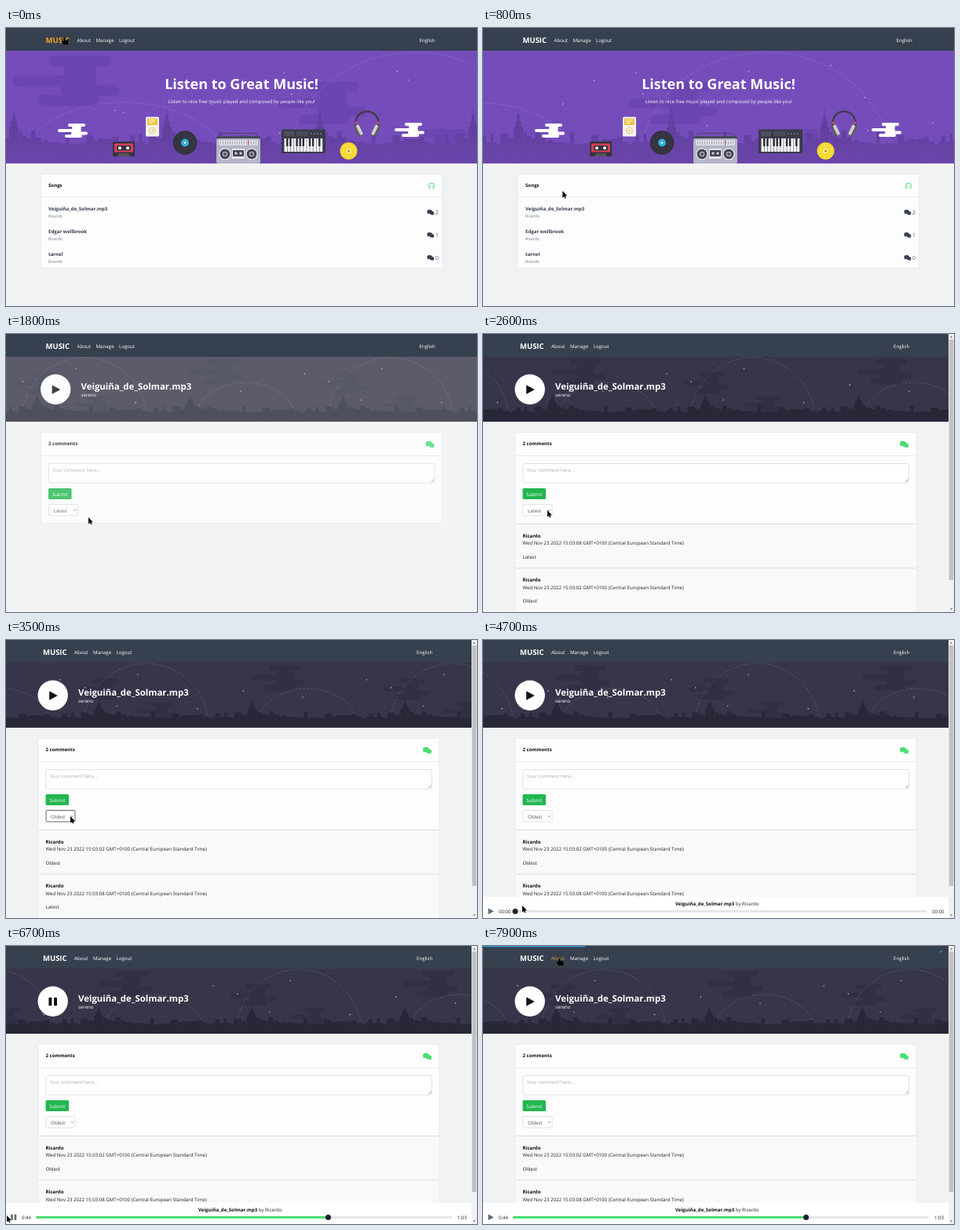
Animation of 600 by 355 pixels, one loop 8000 ms. Source, as an HTML page with a canvas:

```html
<!DOCTYPE html>
<html lang="en">
<head>
<meta charset="utf-8">
<title>Music</title>
<style>
html, body { margin: 0; width: 600px; height: 355px; overflow: hidden; background: #f1f2f4; }
canvas { display: block; }
</style>
</head>
<body>
<canvas width="600" height="355"></canvas>
<script>
const c = document.querySelector('canvas').getContext('2d');
c.textRendering = 'geometricPrecision';
const LOOP = 8000, STEP = 100, TILE = 195;
const SONG = 'Veiguiña_de_Solmar.mp3', USER = 'Ricardo';
const BG = '#f1f2f4', INK = '#363f4d', GREEN = '#4ade73';
const PURPLE = { sky: '#744dbb', cloud: '#6b46b0', shade: '#61409f', ground: '#6b46ab' };
const NIGHT = { sky: '#363549', cloud: '#302f43', shade: '#272738', ground: '#272738' };

// Pointer stops: time, x, y
const path = [[0, 74, 12], [100, 76, 15], [1000, 105, 236], [1800, 105, 234], [2600, 82, 225],
  [3600, 82, 225], [4200, 62, 72], [4400, 62, 72], [4700, 50, 339], [5000, 9, 344], [5300, 9, 344],
  [5900, 411, 344], [6100, 411, 344], [6700, 1, 344], [6900, 8, 344], [7600, 97, 16], [8000, 97, 16]];

const clamp = v => Math.max(0, Math.min(1, v));
const mod = (a, n) => ((a % n) + n) % n;
const rnd = n => mod(Math.sin(n * 12.9898) * 43758.5453, 1);

function rect(x, y, w, h, fill, r = 0, line) {
  c.beginPath();
  c.roundRect(x, y, w, h, r);
  if (fill) { c.fillStyle = fill; c.fill(); }
  if (line) { c.strokeStyle = line; c.lineWidth = 0.7; c.stroke(); }
}
function disc(x, y, r, fill) {
  c.beginPath();
  c.arc(x, y, r, 0, 7);
  c.fillStyle = fill;
  c.fill();
}
function poly(points, fill) {
  c.beginPath();
  for (let i = 0; i < points.length; i += 2) c.lineTo(points[i], points[i + 1]);
  c.closePath();
  c.fillStyle = fill;
  c.fill();
}
function arc(x, y, r, a, b, color, width) {
  c.beginPath();
  c.arc(x, y, r, a, b);
  c.strokeStyle = color;
  c.lineWidth = width;
  c.stroke();
}
function text(s, x, y, size = 6.1, color = '#222', bold = false, align = 'left') {
  c.font = `${bold ? 700 : 400} ${size}px "Open Sans", "Noto Sans", sans-serif`;
  c.textAlign = align;
  c.fillStyle = color;
  c.fillText(s, x, y);
}

function pills(x, y, color, k = 1) {
  [[8, 0, 22], [13, 3.5, 12], [-5, 7, 30], [12, 10.5, 21], [4, 14, 22]]
    .forEach(([a, b, w]) => rect(x + a * k, y + b * k, w * k, 4 * k, color, 2 * k));
}

// Drifting sky with a repeating skyline
function banner(y, h, off, tone, k) {
  const bottom = y + h, tile = TILE * 2 * k;
  c.save();
  c.beginPath();
  c.rect(0, y, 600, h);
  c.clip();
  rect(0, y, 600, h, tone.sky);
  for (let x = mod(off, tile) - tile; x < 700; x += tile) {
    pills(x + 8 * k, y + 3 * k, tone.cloud, 1.8 * k);
    pills(x + 175 * k, y + 20 * k, tone.cloud, 1.5 * k);
    pills(x + 250 * k, y + 50 * k, tone.cloud, 1.3 * k);
    for (let i = 0; i < 9 * k; i++)
      disc(x + rnd(i + 3) * tile, y + rnd(i + 31) * h * 0.92, 0.8,
        i % 3 ? 'rgba(255,255,255,.65)' : 'rgba(255,205,130,.75)');
    c.setLineDash([3, 2]);
    c.lineWidth = 0.7;
    c.strokeStyle = 'rgba(255,255,255,.22)';
    for (const [cx, peak, rx] of [[70, 33, 65], [255, 1, 80]]) {
      c.beginPath();
      c.ellipse(x + cx * k, bottom, rx * k, h - peak * k, 0, Math.PI, 6.28);
      c.stroke();
    }
    c.setLineDash([]);
  }
  const fill = c.createLinearGradient(0, bottom - 22 * k, 0, bottom);
  fill.addColorStop(0, tone.shade);
  fill.addColorStop(1, tone.ground);
  c.fillStyle = fill;
  for (let x = mod(off, TILE) - TILE; x < 620; x += TILE) {
    for (let b = -2, i = 1; b < TILE; i++) {
      const w = 3 + rnd(i) * 6, height = (12 + rnd(i + 50) * 10) * k;
      c.fillRect(x + b, bottom - height, w + 0.5, height);
      b += w;
    }
    [[12, 23], [8, 27], [4, 31], [1, 35]].forEach(([w, top]) => c.fillRect(x - w / 2, bottom - top * k, w, top * k));
  }
  c.restore();
}

function chat(x, y, color, k = 1) {
  c.save();
  c.translate(x, y);
  c.scale(k, k);
  c.fillStyle = color;
  for (const [dx, dy, rx, ry] of [[2, 1.5, 3.6, 2.7], [-1.5, -0.8, 4, 3]]) {
    c.beginPath();
    c.ellipse(dx, dy, rx, ry, 0, 0, 7);
    c.fill();
  }
  poly([-4.5, 0, -5.2, 3, -1, 1.8], color);
  poly([4, 2, 5.4, 4.8, 1, 4], color);
  c.restore();
}

function instruments() {
  pills(71, 122, '#fff');
  pills(500, 121, '#fff');
  // cassette
  rect(136, 145, 28, 19, '#35343f', 1);
  rect(138, 147.5, 24, 11, '#d8405a', 1);
  rect(141, 150, 18, 6.5, '#35343f', 2);
  disc(145, 153.3, 2, '#fff');
  disc(155, 153.3, 2, '#fff');
  poly([142, 164, 144, 160, 156, 160, 158, 164], '#55535e');
  // pocket player
  rect(178, 113.5, 17, 25, '#f3f2f5', 1.5);
  rect(180, 115.5, 13, 8.5, '#efc33c');
  for (let i = 0; i < 3; i++) rect(182, 117 + i * 2, 9 - i * 2, 0.8, '#fff');
  disc(186.5, 131, 4.3, '#eac254');
  disc(186.5, 131, 3.2, '#f3f2f5');
  disc(186.5, 131, 1.2, '#eac254');
  // records
  disc(228, 146.5, 15.3, '#32333f');
  [12, 9.5, 7].forEach(r => arc(228, 146.5, r, 0, 7, '#42434f', 0.5));
  disc(228, 146.5, 5, '#31b1da');
  disc(228, 146.5, 1.2, '#fff');
  disc(436.5, 157, 11, '#f6d92a');
  arc(436.5, 157, 7.5, 0, 7, '#fbe86f', 0.8);
  disc(436.5, 157, 3.5, '#fbeb8c');
  disc(436.5, 157, 1.5, '#b78b1e');
  // boombox
  rect(272, 134.5, 48, 10, null, 2, '#45435a');
  rect(268, 138, 56, 14, '#4a485f', 2);
  rect(268, 141, 56, 32, '#b3b5c6', 2);
  rect(271, 143, 50, 7, '#dcdde6', 1);
  for (let x = 273; x < 319; x += 3) rect(x, 144.5, 0.6, 4, '#8b8b9a');
  rect(308, 143, 1, 7, '#e34b7c');
  for (const x of [279, 313]) {
    disc(x, 161, 8, '#d5d6e0');
    disc(x, 161, 6.2, '#3e3d4d');
    disc(x, 161, 3.6, '#9a9bab');
    disc(x, 161, 1.6, '#3e3d4d');
  }
  rect(288, 154, 16, 13, '#e2e3ea', 1);
  rect(289, 156, 14, 8, '#454552', 1);
  disc(293, 160, 1.7, '#cfd0da');
  disc(299, 160, 1.7, '#cfd0da');
  // keyboard
  rect(351, 129.5, 56, 30.5, '#3a3a48', 1);
  rect(354, 132, 13, 6, '#4f4f5d');
  rect(370, 132, 15, 6, '#4a4a58');
  for (let i = 0; i < 4; i++) disc(389 + i * 4, 135, 1, '#77788a');
  for (let i = 0; i < 12; i++) rect(354.5 + i * 4.1, 141, 3.6, 17, '#f5f5f8');
  for (let i = 0; i < 11; i++) if (i % 7 != 2 && i % 7 != 6) rect(357.1 + i * 4.1, 141, 2.4, 10, '#292935');
  // headphones
  arc(460, 121, 14.5, 2.7, 6.75, '#3f3e4b', 2.4);
  for (const s of [-1, 1]) {
    c.save();
    c.translate(460 + s * 11.5, 131);
    c.rotate(s * 0.45);
    rect(-3, -8, 6, 16, '#5d5b67', 3);
    rect(s < 0 ? 0 : -4, -7, 4, 14, '#d6cfc9', 2);
    c.restore();
    disc(460 + s * 14, 121, 1.4, '#e0525e');
  }
}

function home(t, hoverY) {
  banner(29, 144, 10 - t * 0.2, PURPLE, 2);
  text('Listen to Great Music!', 300, 78.3, 18, '#fff', true, 'center');
  text('Listen to nice free music played and composed by people like you!', 300, 95.6, 6.1, '#fff', false, 'center');
  instruments();
  rect(44.5, 186.5, 511, 120, '#fdfdfe', 1, '#e6e8ec');
  text('Songs', 54, 203, 6.1, '#111', true);
  rect(45, 215, 510, 0.8, '#e3e5e9');
  arc(542, 201.5, 3.6, Math.PI, 6.28, GREEN, 0.9);
  rect(538.4, 201.5, 2, 3.5, null, 1, GREEN);
  rect(543.6, 201.5, 2, 3.5, null, 1, GREEN);
  [SONG, 'Edgar wellbrook', 'tarnel'].forEach((name, i) => {
    const y = 216 + i * 29;
    if (hoverY > y && hoverY < y + 29) rect(45, y, 510, 33, '#f3f4f6');
    text(name, 54, y + 16.7, 6.1, INK, true);
    text(USER, 54, y + 26, 5.1, '#6d7480');
    chat(540.8, y + 19, INK, 0.8);
    text(2 - i, 547, y + 22, 7, '#565e6b');
  });
}

function playIcon(x, y, s, on, color) {
  if (on) {
    rect(x - s, y - s, s * 0.75, s * 2, color, s / 5);
    rect(x + s * 0.25, y - s, s * 0.75, s * 2, color, s / 5);
  } else poly([x - s * 0.85, y - s * 1.1, x + s * 1.15, y, x - s * 0.85, y + s * 1.1], color);
}

function songPage(t, dx, playing) {
  banner(29, 83, 94 - (t - 4700) * 0.183, NIGHT, 1);
  c.save();
  c.translate(dx, 0);
  disc(63.2, 70.7, 19.2, '#fff');
  playIcon(63.2, 71, 5.3, playing, '#111');
  text(SONG, 95.5, 71, 11.4, '#fff', true);
  text('sereno', 95.5, 80, 6.1, '#fff');

  const loaded = t >= 2100;
  rect(44.5, 125.5, 511, loaded ? 240 : 116, '#fdfdfe', 1, '#e4e6ea');
  text('2 comments', 54, 142.2, 6.1, '#111', true);
  chat(540, 140.5, GREEN);
  rect(45, 155, 510, 0.8, '#e3e5e9');
  rect(54.5, 165.5, 491.5, 24.5, '#fff', 1.5, '#d2d5db');
  text('Your comment here...', 59, 175.7, 6.1, '#a5abb5');
  c.beginPath();
  c.moveTo(542, 188.5); c.lineTo(545, 185.5);
  c.moveTo(544, 188.5); c.lineTo(545, 187.5);
  c.strokeStyle = '#777';
  c.stroke();
  rect(54, 197, 29.5, 14, '#22b64f', 1.5);
  text('Submit', 68.8, 206.5, 6.1, '#fff', false, 'center');

  const oldest = t >= 3300, focus = t >= 2700 && t < 4300;
  rect(54.5, 217.5, 37, 14.5, '#fff', 1.5, focus ? '#222' : '#d2d5db');
  text(oldest ? 'Oldest' : 'Latest', 60.5, 227.5, 6.1, '#4b5361');
  c.beginPath();
  c.moveTo(86.3, 224.3); c.lineTo(87.8, 225.8); c.lineTo(89.3, 224.3);
  c.strokeStyle = '#555';
  c.stroke();

  if (loaded) {
    const list = [['02', 'Oldest'], ['08', 'Latest']];
    if (!oldest) list.reverse();
    list.forEach(([sec, body], i) => {
      const y = 242 + i * 56.5;
      rect(45, y, 510, 57, '#f8f9fb');
      rect(45, y, 510, 0.9, '#d9dce1');
      text(USER, 54, y + 17.5, 6.1, '#111', true);
      text(`Wed Nov 23 2022 15:03:${sec} GMT+0100 (Central European Standard Time)`, 54, y + 27.3, 6.1, '#222');
      text(body, 54, y + 44.8, 6.1, '#222');
    });
  }
  c.restore();
}

function player(t, playing) {
  const begun = t >= 5200;
  const sec = t < 5900 ? Math.max(0, (t - 5200) / 1000) : 43.7 + Math.min(0.6, (t - 5900) / 1700);
  const end = begun ? 568 : 565, x = 41 + (begun ? sec / 63 * 527 : 0);
  const clock = s => Math.floor(s / 60) + ':' + String(Math.floor(s % 60)).padStart(2, '0');
  rect(0, 328, 593, 27, '#fff');
  text(SONG, 245, 338.6, 6.1, '#111', true);
  const w = c.measureText(SONG).width;
  text(' by ' + USER, 245 + w, 338.6, 6.1, '#222');
  playIcon(9.7, 346.4, 3.6, playing, '#626873');
  text(begun ? clock(t < 5900 ? sec : 44) : '00:00', 20, 348.6, 6.1, '#222');
  text(begun ? '1:03' : '00:00', begun ? 575 : 572, 348.6, 6.1, '#222');
  rect(38, 345, end - 38, 3, '#e4e5e8', 1.5);
  if (begun) rect(38, 345, x - 38, 3, GREEN, 1.5);
  disc(x, 346.5, 3.5, '#1c2230');
}

function header(dx, x, y, t) {
  const logo = t < 200, about = x > 85 && x < 106 && y < 24;
  rect(0, 0, 600, 29, '#37404e');
  text('MUSIC', 50.5 + dx, 18.8, 9.5, logo ? '#f0a41f' : '#fff', true);
  text('About', 90.5 + dx, 18.2, 6.2, about ? '#d59f35' : '#fff');
  text('Manage', 114.5 + dx, 18.2, 6.2, '#fff');
  text('Logout', 144 + dx, 18.2, 6.2, '#fff');
  text('English', 526.5 + dx, 17.5, 6.1, '#fff');
  return logo || about;
}

function loader(width, dx, t) {
  const turn = t / 500 * 2 * Math.PI - 1.7;
  rect(0, 0, width, 1.2, '#29a0d8');
  arc(590 + dx, 9.5, 3, turn, turn + 1.9, '#29a0d8', 0.9);
}

function scrollbar() {
  rect(593, 0, 7, 355, '#f1f1f1');
  rect(593.7, 7, 5.6, 307, '#c1c1c1');
  poly([595, 4.5, 596.5, 2.5, 598, 4.5], '#666');
  poly([595, 350.5, 596.5, 352.5, 598, 350.5], '#666');
}

function pointer(x, y, hand) {
  c.save();
  c.translate(x, y);
  if (hand) {
    rect(-0.7, 0, 2, 7, '#000', 1);
    rect(-0.7, 3.5, 6.2, 5.5, '#000', 1.5);
    poly([-3.4, 4.5, -2, 4, 0, 6, 0, 9, -1, 9], '#000');
  } else poly([0, 0, 0, 8.6, 1.9, 6.9, 3.2, 9.6, 4.5, 9, 3.3, 6.4, 5.8, 6.2], '#000');
  c.restore();
}

function draw() {
  const t = Math.floor(performance.now() % LOOP / STEP) * STEP;
  const i = path.findIndex(p => p[0] > t), [a, b] = [path[i - 1], path[i]];
  let k = (t - a[0]) / (b[0] - a[0]);
  k = k * k * (3 - 2 * k);
  const x = a[1] + (b[1] - a[1]) * k, y = a[2] + (b[2] - a[2]) * k;
  const first = t < 1600, dx = t >= 2100 ? -3.5 : 0;
  const playing = t >= 5200 && t < 6900;

  rect(0, 0, 600, 355, BG);
  if (first) home(t, y);
  else songPage(t, dx, playing);
  c.globalAlpha = first ? clamp((t - 1200) / 500) : clamp((2000 - t) / 400) * 0.4;
  rect(0, 29, 600, 326, BG);
  c.globalAlpha = 1;

  const link = header(dx, x, y, t);
  if (t >= 4400) player(t, playing);
  if (dx) scrollbar();
  if (t >= 1100 && first) loader(clamp((t - 1000) / 400) * 600, 0, t);
  if (t >= 7700) loader((t - 7700) * 0.65, -6, t);
  const overPlay = Math.hypot(x - 60, y - 71) < 19 && !first;
  pointer(x, y, link || overPlay || (first && y > 216));
  requestAnimationFrame(draw);
}
draw();
</script>
</body>
</html>
```
